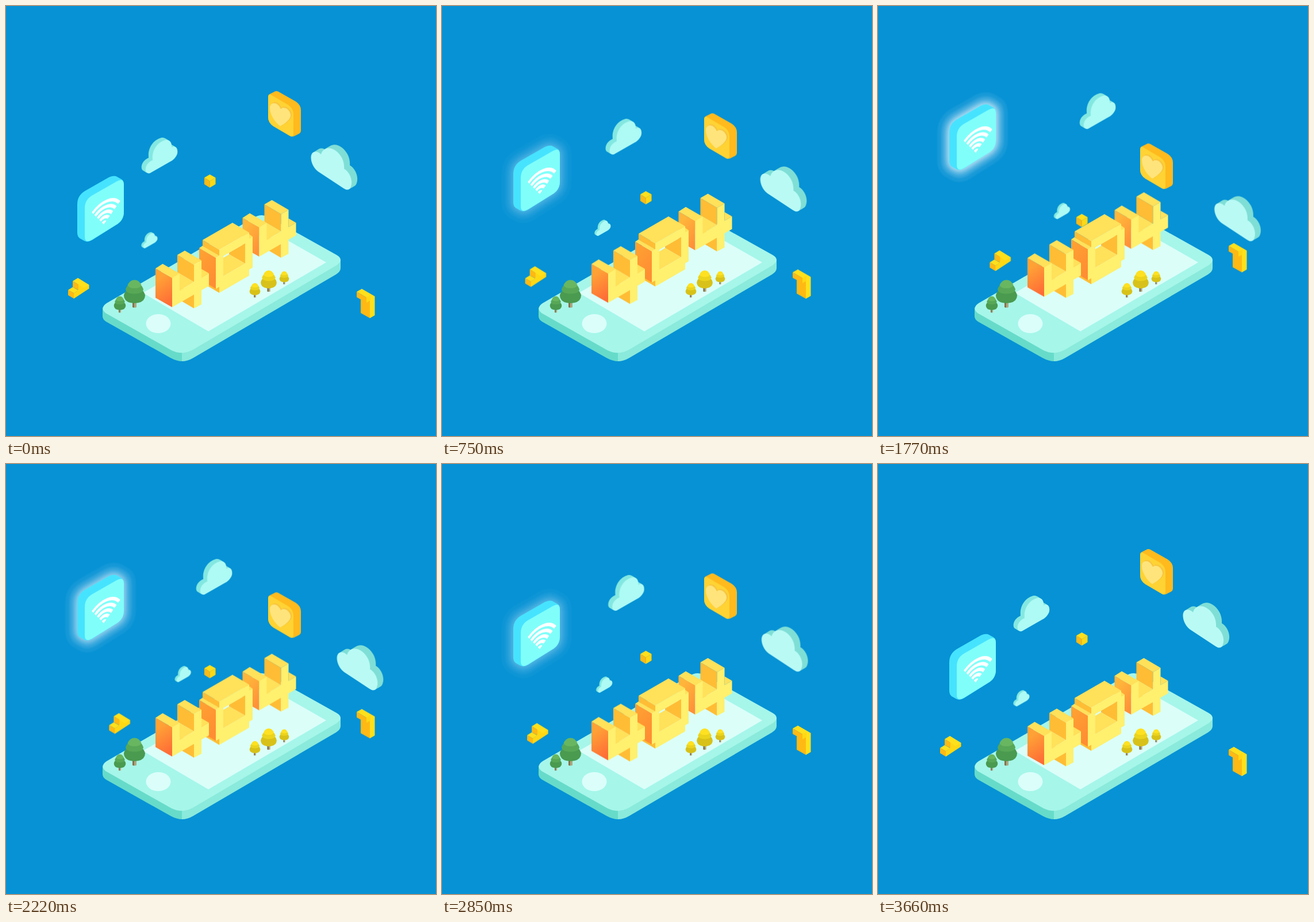
Write an HTML page that moves like this. It is 748x748 px and loops after 3.69 s.

```html
<!DOCTYPE html>
<html lang="en">
<head>
<meta charset="utf-8">
<title>404</title>
<style>
  html, body { margin: 0; width: 100%; height: 100%; overflow: hidden; background: #0692d5; }
  svg { display: block; width: 100vw; height: 100vh; }

  .drift, .glow, .bob { animation: drift 3690ms linear infinite; }
  .glow { animation-name: glow; }
  .bob.mid { animation-name: bobMid; }
  .bob.fast { animation-name: bobFast; }

  @keyframes drift {
    0%, 99.19%, 100% { transform: translate(0, 0); }
    50% { transform: translate(var(--x, 0px), var(--y, 0px)); }
  }
  @keyframes glow {
    0%, 99.19%, 100% { opacity: 0; }
    50% { opacity: 1; }
  }
  @keyframes bobMid {
    0%, 87.9%, 100% { transform: translateY(0); }
    35.9% { transform: translateY(-19.5px); }
  }
  @keyframes bobFast {
    0%, 75%, 100% { transform: translateY(0); }
    35.9% { transform: translateY(-19.5px); }
  }

  .green { --lo: #4a9a50; --mid: #57a757; --hi: #68b660; }
  .gold { --lo: #d8c219; --mid: #ecd41c; --hi: #ffe122; }
  .front { fill: #fff06e; }
  .top { fill: #ffe15a; }
  .side { fill: #ffbd35; }
  .amber { fill: #ffb914; }
  .lemon { fill: #ffe01c; }
  .yellow { fill: #ffd814; }
</style>
</head>
<body>
<svg viewBox="0 0 748 748">
  <defs>
    <linearGradient id="hot" x1="0.3" y1="0" x2="0.6" y2="1">
      <stop offset="0.2" stop-color="#ffa236"/><stop offset="1" stop-color="#ff6b36"/>
    </linearGradient>
    <linearGradient id="warm" x1="0" y1="0" x2="0.5" y2="1">
      <stop offset="0" stop-color="#ffa432"/><stop offset="1" stop-color="#ff8d33"/>
    </linearGradient>
    <linearGradient id="mild" x1="0.2" y1="0" x2="0.7" y2="1">
      <stop offset="0.2" stop-color="#ffb53a"/><stop offset="1" stop-color="#ff8f3a"/>
    </linearGradient>
    <filter id="soft" x="-50%" y="-50%" width="200%" height="200%"><feGaussianBlur stdDeviation="6"/></filter>
    <filter id="haze" x="-50%" y="-50%" width="200%" height="200%"><feGaussianBlur stdDeviation="1.5"/></filter>

    <g id="tree">
      <path d="M-3.5 36H0V48Q-2 48.500-3.500 47.500Z" fill="#80734f"/>
      <path d="M0 36H3.500V47.500Q2 48.500 0 48Z" fill="#b3a478"/>
      <path d="M-18.500 27Q-17 16 0 12Q17 16 18.500 27Q18 40 0 40.500Q-18 40-18.500 27Z" fill="var(--lo)"/>
      <path d="M-15.500 16Q-13 7 0 3Q13 7 15.500 16Q15 24 0 24Q-15 24-15.500 16Z" fill="var(--mid)"/>
      <path d="M-12 9Q-8 0 0 0Q8 0 12 9Q10 14.500 0 14.500Q-10 14.500-12 9Z" fill="var(--hi)"/>
    </g>

    <g id="four">
      <path class="side" d="M298 485L327 502V526L298 509Z"/>
      <path class="top" d="M273 478L298 463L327 480L302 495Z"/>
      <path class="side" d="M298 433L327 450V480L298 463Z"/>
      <path class="top" d="M298 433L311 425.500L340 442.500L327 450Z"/>
      <path class="top" d="M340 457.500L353 465L340 472.500Z"/>
      <path d="M260 456.500L289 473V524L260 507.500Z"/>
      <path class="top" d="M260 456.500L272.500 448.500L302 465.500L289 473Z"/>
      <path class="front" d="M289 473L302 465.500V495L327 480V450L340 442.500V472.500L353 465V487L340 494.500V519L327 526V502L289 524Z"/>
    </g>

    <path id="puff" d="M250 291C239 293 240 274 255 268C253 250 264 237 276 233.500C285 231 289 239 288 246C296 241 300 250 297.500 258C295 264 290 269 285 271Z"/>
    <g id="cloud">
      <g fill="#84e8e1">
        <use href="#puff" x="-7" y="-4"/><use href="#puff" x="-5" y="-3"/>
        <use href="#puff" x="-3.500" y="-2"/><use href="#puff" x="-1.700" y="-1"/>
      </g>
      <use href="#puff" fill="#aefaf4"/>
    </g>
    <path id="bigPuff" d="M543 288C532 280 528 264 532 257C536 251 544 254 548 258C551 246 564 244 574 252C583 259 589 270 588 283C597 288 604 302 600 314C598 320.500 593 321 587 317Z"/>
    <path id="tile" d="M124 345Q124 330 137 322L179 298Q188 294 193 297L201 301.500Q205 304 205 311V358Q205 373 192 380.500L150 407Q142 412 136 408.500L128 404Q124 401 124 394Z"/>
  </defs>

  <rect width="748" height="748" fill="#0692d5"/>

  <!-- phone -->
  <path fill="#67dbca" d="M168 525V540Q168 545 174 549L286 612Q297 618 307 618V600Z"/>
  <path fill="#8aeadb" d="M306 600V618Q316 618 326 612L574 467Q582 462 582 456V441Z"/>
  <path fill="#a6f6ea" d="M173 534Q163 525 175 517L430 369Q443 360 457 367L575 433Q589 441 575 451L325 598Q306 608 288 599Z"/>
  <path fill="#dbfef9" d="M238 499L443 381L557 446L352 566Z"/>
  <ellipse cx="265" cy="552.500" rx="21.500" ry="16.500" fill="#dbfefa"/>

  <g class="green">
    <use href="#tree" transform="translate(223.500 476.500)"/>
    <use href="#tree" transform="translate(198 505) scale(.56 .59)"/>
  </g>

  <!-- small cube -->
  <g class="drift" style="--y:71.500px">
    <path class="lemon" d="M345 298.500L354.500 293L364.500 298.500L354.500 304.500Z"/>
    <path class="amber" d="M345 298.500L354.500 304.500V316L345 310Z"/>
    <path class="yellow" d="M354.500 304.500L364.500 298.500V310L354.500 316Z"/>
  </g>

  <!-- digits -->
  <g class="bob fast"><use href="#four" x="151.500" y="-88" fill="url(#mild)"/></g>
  <g class="bob mid">
    <path class="side" d="M342 475L371 488V499L342 482Z"/>
    <path class="top" d="M336 421L342 417L371 434.500L365 438Z"/>
    <path class="side" d="M342 407L371 424V434.500L342 417.500Z"/>
    <path fill="url(#warm)" d="M336 421L365 438V492L336 475Z"/>
    <path class="top" d="M342 407L394 377L423 394L371 424Z"/>
    <path class="top" d="M423 397L429 401L423 405Z"/>
    <path class="side" d="M416 413V448L388 432V429Z"/>
    <path class="top" d="M416 448L378 470V438L388 432Z"/>
    <path class="front" fill-rule="evenodd" d="M371 424L423 394V404.500L429 401V455L423 458.500V469L371 499V488.500L365 492V438L371 434.500ZM378 435L416 413V448L378 470Z"/>
  </g>
  <g class="drift" style="--y:-19px"><use href="#four" fill="url(#hot)"/></g>

  <g class="gold">
    <use href="#tree" transform="translate(433 482) scale(.51 .52)"/>
    <use href="#tree" transform="translate(457 460) scale(.75 .77)"/>
    <use href="#tree" transform="translate(484 461.500) scale(.45 .47)"/>
  </g>

  <!-- clouds -->
  <g class="drift" style="--x:120px;--y:-80.500px"><use href="#cloud"/></g>
  <g class="drift" style="--x:73.500px;--y:-53px">
    <use href="#cloud" transform="translate(129.300 290.400) scale(.45)"/>
  </g>
  <g class="drift" style="--x:57px;--y:93.300px">
    <g fill="#7fdfd6">
      <use href="#bigPuff" x="10" y="-6"/><use href="#bigPuff" x="8" y="-4.800"/>
      <use href="#bigPuff" x="6" y="-3.600"/><use href="#bigPuff" x="4" y="-2.400"/>
      <use href="#bigPuff" x="2" y="-1.200"/>
    </g>
    <use href="#bigPuff" fill="#b9faf5"/>
  </g>

  <!-- heart tile -->
  <g class="drift" style="--y:95px">
    <path fill="#ffba1e" d="M456 158Q456 155 459 153L467 149Q470 147 474 149L504 166Q513 172 513 181V217Q513 220 510 222L502 226Q498 228 494 226L465 209Q456 203 456 193Z"/>
    <path fill="#ffd333" d="M456 159Q456 151 462 155L491 172Q500 178 500 188V222Q500 229 494 226L465 209Q456 203 456 193Z"/>
    <g id="heart">
      <path id="heartShape" fill="#f8c640" transform="translate(1.500 -1)" d="M478 209C470 203 459 190 459 177C459 166 472 164 478 178C484 172 496 180 496 190C496 197 487 204 478 209Z"/>
      <path fill="#ffe47c" d="M477 209C469 203 459 190 459 177C459 167 472 165 478 179C484 173 495 181 495 190C495 197 486 204 477 209Z"/>
    </g>
  </g>

  <!-- signal tile -->
  <g class="drift" style="--y:-130px">
    <g class="glow" stroke-linejoin="round" fill="#fff" stroke="#fff">
      <use href="#tile" stroke-width="42" opacity=".08" filter="url(#haze)"/>
      <use href="#tile" stroke-width="28" opacity=".08" filter="url(#haze)"/>
      <use href="#tile" stroke-width="9" opacity=".75" filter="url(#soft)"/>
    </g>
    <use href="#tile" fill="#46e3ff"/>
    <path fill="#80fffa" d="M137 352Q137 337 150 329.500L192 305.500Q205 298 205 311V358Q205 373 192 380.500L150 406.500Q137 414 137 401Z"/>
    <g transform="matrix(-21 -21 29 -41 170 380)" fill="none" stroke="#fff" stroke-width=".13">
      <path d="M.93 0A.93 .93 0 0 1 0 .93M.71 0A.71 .71 0 0 1 0 .71M.5 0A.5 .5 0 0 1 0 .5M.3 0A.3 .3 0 0 1 0 .3"/>
      <path d="M0 0H.15A.15 .15 0 0 1 0 .15Z" fill="#fff" stroke="none"/>
    </g>
  </g>

  <!-- loose blocks -->
  <g class="drift" style="--x:90px;--y:-50px">
    <path class="yellow" d="M118 499.500L125 495V484L144.500 485V491.500L118 509Z"/>
    <path class="lemon" d="M108 494L116 489L126 494.500L118 499.500ZM116 478.500L125 473L144.500 485L135 490.500L125 484Z"/>
    <path class="amber" d="M116 478.500L126 484.500V494L116 489ZM108 494L118 499.500V509L108 503Z"/>
  </g>
  <g class="drift" style="--y:-83px">
    <path class="amber" d="M617 507L633 510V543L617 534Z"/>
    <path class="lemon" d="M633 510L641.500 505V538L633 543ZM610 497L619 492L641.500 505L633 510L627 507Z"/>
    <path class="amber" d="M610 497L627 507V516L610 506.500Z"/>
    <path class="yellow" d="M627 507L634 503V512L627 516Z"/>
  </g>
</svg>
</body>
</html>
```
